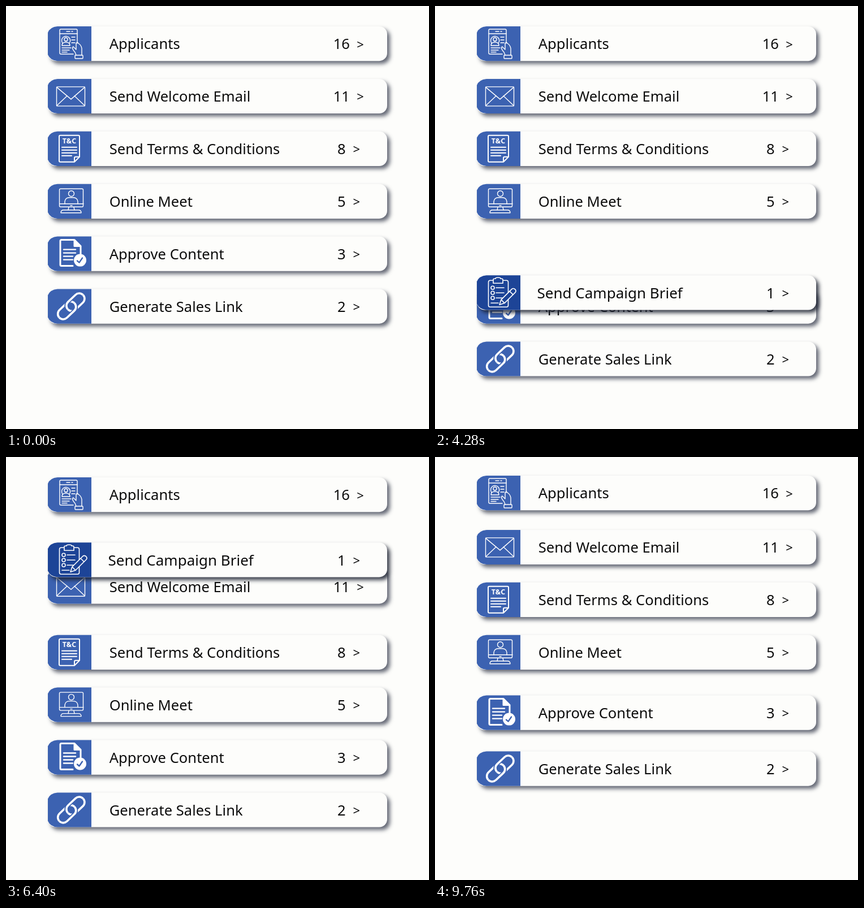
Write an HTML page with a canvas that moves like this. It is 748 px wide and 748 px high and loops after 9800 ms.

```html
<!DOCTYPE html>
<html lang="en">
<head>
<meta charset="utf-8">
<title>Stage list</title>
<style>
html, body { margin: 0; width: 100%; height: 100%; overflow: hidden; background: #fdfdfb; }
canvas { display: block; width: 748px; height: 748px; }
</style>
</head>
<body>
<canvas id="stage" width="748" height="748"></canvas>
<script>
const stage = document.getElementById('stage');
const layer = stage.cloneNode();
const layerCtx = layer.getContext('2d');
let ctx = stage.getContext('2d');

const LOOP = 9800;
const PITCH = 92.9;
const PAPER = '#fdfdfb';
const INK = '#0c0c0c';
const BLUE = '#3c62b1';
const NAVY = '#1d4497';
const SHADE = 'rgba(48,54,72,.74)';
const DARK_SHADE = 'rgba(24,30,45,.86)';
const FONT = '"Noto Sans", "Open Sans", sans-serif';

const clamp = v => Math.max(0, Math.min(1, v));
const span = (t, from, to) => clamp((t - from) / (to - from));
const mix = (a, b, p) => a + (b - a) * p;
const easeInOut = p => (1 - Math.cos(Math.PI * p)) / 2;
const easeOut = p => 1 - (1 - p) ** 2;

// Icon helpers: coordinates are stage x and y below the card's top edge.
function line(...points) {
  ctx.beginPath();
  for (let i = 0; i < points.length; i += 2) ctx.lineTo(points[i], points[i + 1]);
  ctx.stroke();
}
function box(x, y, w, h, r = 0) {
  ctx.beginPath();
  ctx.roundRect(x, y, w, h, r);
  ctx.stroke();
}
function ring(x, y, r, from = 0, to = 2 * Math.PI) {
  ctx.beginPath();
  ctx.arc(x, y, r, from, to);
  ctx.stroke();
}
function path(d, filled) {
  const p = new Path2D(d);
  if (filled) ctx.fill(p);
  ctx.stroke(p);
}
function write(text, x, y, size, weight = 400, align = 'left') {
  ctx.font = `${weight} ${size}px ${FONT}`;
  ctx.textAlign = align;
  ctx.fillText(text, x, y);
}

const icons = {
  phone() {
    ctx.lineWidth = 1.4;
    path('M119 49H97Q95 49 95 47V7Q95 5 97 5H124Q126 5 126 7V30');
    line(95, 13, 126, 13);
    line(107, 9, 113, 9);
    line(116, 9, 118, 9);
    ring(106, 25, 7.5, 2.5, 6.9);
    ring(106, 23, 3);
    path('M99 34Q99 28 106 28Q113 28 113 34Z');
    for (const y of [19, 24, 29]) line(116, y, 122, y);
    line(99, 38, 115, 38);
    line(99, 42, 112, 42);
    line(99, 45.5, 108, 45.5);
    path('M124 51Q123 46 119 42Q116 37 119 36L124 41V30Q126 27 128 30Q133 33 134 39V51');
    box(122, 51, 14, 6, 1);
  },
  envelope() {
    ctx.lineWidth = 1.4;
    box(89.5, 14, 50, 34, 1);
    line(90, 15, 115, 36, 139, 15);
    line(90, 47, 108, 30);
    line(139, 47, 121, 30);
  },
  terms() {
    ctx.lineWidth = 2;
    path('M121 54H96Q94 54 94 52V9Q94 7 96 7H128Q130 7 130 9V45L121 54V47Q121 45 123 45H130');
    write('T&C', 112, 21.5, 12.5, 800, 'center');
    for (const y of [28, 33, 38, 43]) line(99, y, y > 40 ? 116 : 125, y);
  },
  monitor() {
    ctx.lineWidth = 1.4;
    box(94.5, 8.5, 42, 32, 2);
    line(95, 35, 137, 35);
    line(114, 38, 117, 38);
    ring(115.5, 17, 5);
    path('M104 35V31Q105 24 112 24H119Q126 24 127 31V35');
    line(111, 41, 110, 46);
    line(120, 41, 121, 46);
    path('M97 51Q97 46 102 46H128Q133 46 133 51Z');
  },
  approve() {
    ctx.lineWidth = 3;
    path('M118 52H98Q96 52 96 50V8Q96 6 98 6H121L132 17V32');
    path('M121 7V17H131Z', true);
    ctx.lineWidth = 2.4;
    for (const y of [23, 29, 35, 41]) line(102, y, y < 32 ? 123 : 118, y);
    ctx.beginPath();
    ctx.arc(131, 42, 11, 0, 2 * Math.PI);
    ctx.fill();
    ctx.strokeStyle = BLUE;
    line(126, 43, 129.5, 46, 135, 38);
  },
  chain() {
    ctx.translate(115.3, 30.5);
    ctx.rotate(-0.76);
    const link = side => {
      const capsule = new Path2D();
      capsule.roundRect(side < 0 ? -29 : -8, -9.5, 37, 19, 9.5);
      ctx.strokeStyle = BLUE;
      ctx.lineWidth = 7;
      ctx.stroke(capsule);
      ctx.strokeStyle = '#fff';
      ctx.lineWidth = 3.6;
      ctx.stroke(capsule);
    };
    for (const half of [-1, 1]) {
      ctx.save();
      ctx.beginPath();
      ctx.rect(-45, half < 0 ? -20 : 0, 90, 20);
      ctx.clip();
      link(half);
      link(-half);
      ctx.restore();
    }
  },
  clipboard() {
    ctx.lineWidth = 1.6;
    box(94.5, 9, 35, 47, 3);
    ctx.fillStyle = NAVY;
    path('M103 14V7Q103 6 105 6H107Q107 4 110 4H113Q116 4 116 6H118Q120 6 120 8V14Z', true);
    for (const y of [22, 31, 40]) {
      ring(102, y, 3);
      line(108, y, 122, y);
    }
    line(99, 49, 112, 49);
    path('M114 52L117 43L136 24Q139 22 142 25Q144 28 142 30L123 49Z', true);
    line(117, 43, 123, 49);
    line(132, 28, 138, 34);
  }
};

function panel(x, y, w, h, r, shade) {
  ctx.save();
  ctx.shadowColor = shade;
  ctx.shadowBlur = 7;
  ctx.shadowOffsetX = ctx.shadowOffsetY = 5;
  ctx.fillStyle = PAPER;
  ctx.beginPath();
  ctx.roundRect(x, y, w, h, r);
  ctx.fill();
  ctx.restore();
}

// Paints a group on its own layer so that it fades as one picture.
function faded(alpha, paint) {
  if (!alpha) return;
  const base = ctx;
  ctx = layerCtx;
  ctx.clearRect(0, 0, 748, 748);
  paint();
  ctx = base;
  ctx.globalAlpha = alpha;
  ctx.drawImage(layer, 0, 0);
  ctx.globalAlpha = 1;
}

function drawCard(card, y, dx = 0, textDx = 0) {
  ctx.save();
  ctx.translate(dx, y);
  panel(74, 0, 600, 61.2, 14, card.dark ? DARK_SHADE : SHADE);

  ctx.fillStyle = card.dark ? NAVY : BLUE;
  ctx.fill(new Path2D('M151 0H91Q78 1 74 11V50Q78 60 91 61.2H151Z'));

  ctx.save();
  ctx.strokeStyle = ctx.fillStyle = '#fff';
  ctx.lineCap = ctx.lineJoin = 'round';
  icons[card.icon]();
  ctx.restore();

  ctx.fillStyle = INK;
  write(card.count, 593.3, 40.3, 25.6, 400, 'center');
  write('>', card.count > 9 ? 626.5 : 619.7, 39.5, 22, 500, 'center');
  write(card.label, (card.dark ? 180.6 : 182.7) + textDx - dx, 40.3, card.dark ? 26 : 25.6);
  ctx.restore();
}

function drawButton() {
  panel(74, 592, 188, 62.5, 7, SHADE);
  ctx.fillStyle = INK;
  ctx.fillRect(88, 621, 18, 4.4);
  ctx.fillRect(94.8, 614, 4.4, 18);
  write('Add Stage', 125, 632.5, 26);
}

// swap: middle of the card's move down one slot; rest: offset of its closing pose.
const cards = [
  { label: 'Applicants', count: 16, icon: 'phone', rest: -3 },
  { label: 'Send Welcome Email', count: 11, icon: 'envelope', swap: 6270, rest: 0 },
  { label: 'Send Terms & Conditions', count: 8, icon: 'terms', swap: 5590, rest: 0 },
  { label: 'Online Meet', count: 5, icon: 'monitor', swap: 4750, rest: 0 },
  { label: 'Approve Content', count: 3, icon: 'approve', swap: 3870, rest: 14 },
  { label: 'Generate Sales Link', count: 2, icon: 'chain', swap: 3500, rest: 20 }
];
const brief = { label: 'Send Campaign Brief', count: 1, icon: 'clipboard', dark: true };

function cardY(card, i, t) {
  const moved = card.swap ? easeInOut(span(t, card.swap - 400, card.swap + 400)) : 0;
  const closing = easeOut(span(t, 8480, 9560));
  return 36 + PITCH * i + mix(PITCH * moved, card.rest, closing);
}

function render(t) {
  ctx.fillStyle = PAPER;
  ctx.fillRect(0, 0, 748, 748);
  faded(span(t, 1080, 1480) * (1 - span(t, 2600, 2900)), drawButton);
  cards.forEach((card, i) => drawCard(card, cardY(card, i, t)));

  const leave = span(t, 8040, 8400);
  const y = mix(593, 133, span(t, 3520, 6520));
  faded(span(t, 2450, 2850) * (1 - leave), () => drawCard(brief, y, 80 * leave, 65.5 * leave));
}

const start = performance.now();
function tick() {
  render((performance.now() - start) % LOOP);
  requestAnimationFrame(tick);
}
tick();
</script>
</body>
</html>
```
